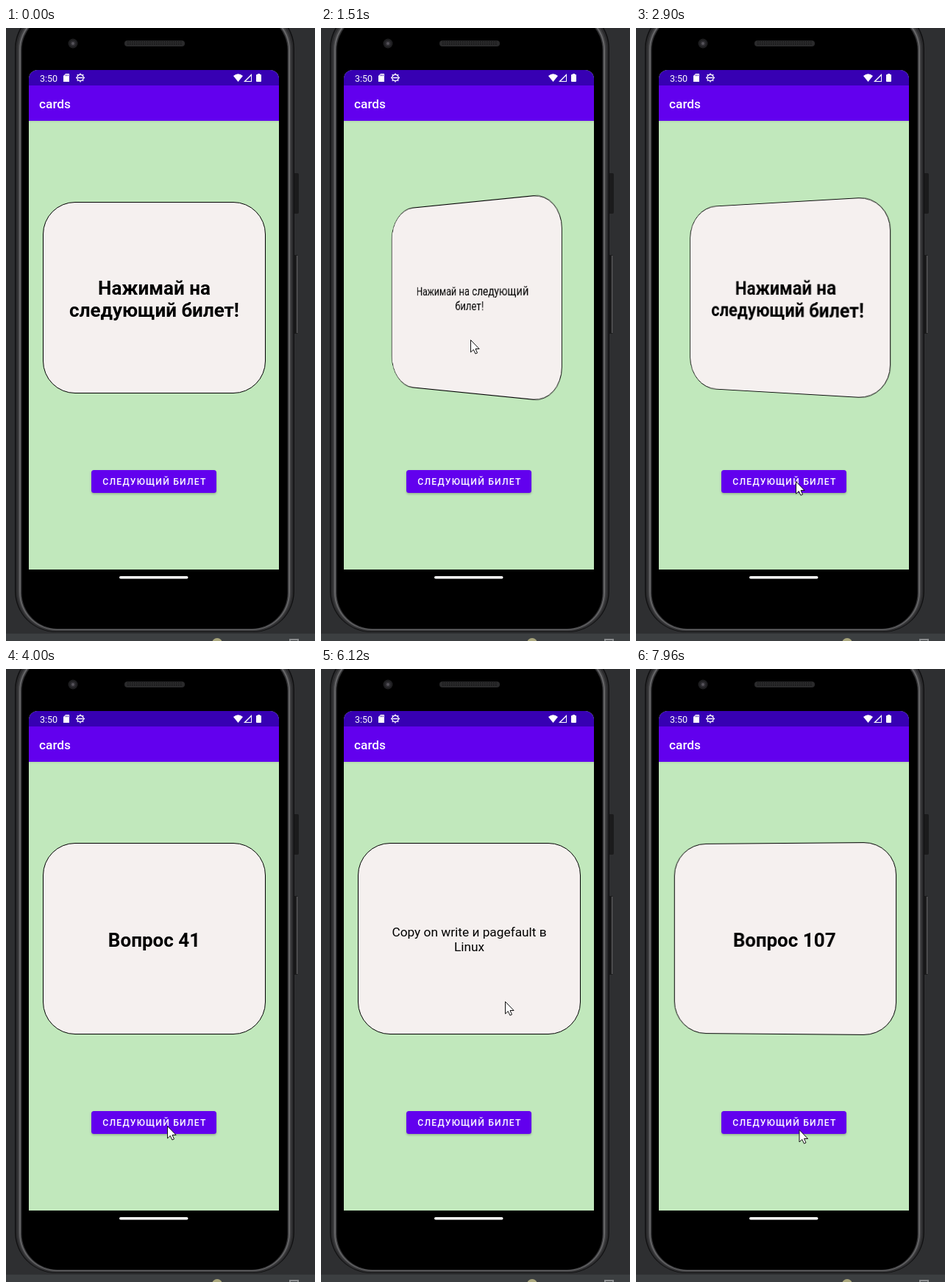
Write an HTML page with a canvas that moves like this. It is 420x832 px and loops after 8 s.

```html
<!DOCTYPE html>
<html lang="ru">
<head>
<meta charset="utf-8">
<title>cards</title>
<style>
  html, body { margin: 0; width: 100%; height: 100%; overflow: hidden; background: #2e2f31; }
  canvas { position: absolute; left: 0; top: 0; width: 420px; height: 832px; }
  #card {
    position: absolute; left: 50px; top: 236px; width: 303px; height: 260px;
    box-sizing: border-box; border: 1px solid #000; border-radius: 44px;
    background: #f5f0ef; color: #000;
    display: flex; align-items: center; justify-content: center;
  }
  #label {
    font: 400 17.3px/1.172 Roboto, sans-serif;
    text-align: center; white-space: pre; transform: translateY(.06em);
  }
  #label.front { font-weight: 700; font-size: 26px; }
</style>
</head>
<body>
<canvas id="phone" width="420" height="832"></canvas>
<div id="card"><div id="label"></div></div>
<canvas id="top" width="420" height="832"></canvas>
<script>
const LOOP = 8000;
const FLIP_MS = 1000;
const FLIPS = [826, 2150, 5120, 7056];
const PRESSES = [
  [740, 826], [2090, 2150], [3480, 3590], [4080, 4190], [4640, 4750], [5010, 5120], [6950, 7050]
];
const RIPPLES = [[3480, 3640], [4080, 4240], [4640, 5080]];
const HELLO = 'Нажимай на\nследующий билет!';
const FRONTS = [[0, HELLO], [3600, 'Вопрос 41'], [4200, 'Вопрос 23'], [4760, 'Вопрос 107']];
const BACKS = ['Нажимай на следующий\nбилет!', 'Copy on write и pagefault в\nLinux'];
// time, x, y of the pointer tip
const PATH = [
  [280, 367, 787], [440, 203, 423], [2560, 203, 423], [2900, 217, 615], [3020, 221, 630],
  [3270, 219, 620], [4820, 219, 620], [4990, 252, 451], [5120, 252, 451], [5200, 250, 451],
  [7200, 250, 451], [7440, 220, 569], [7680, 221.5, 625]
];
const BUTTON = [116, 600, 170, 31, 3.5];

const card = document.getElementById('card');
const label = document.getElementById('label');
const g = document.getElementById('phone').getContext('2d');
const c = document.getElementById('top').getContext('2d');

function box(ctx, x, y, w, h, r, fill) {
  ctx.beginPath();
  ctx.roundRect(x, y, w, h, r);
  if (fill) { ctx.fillStyle = fill; ctx.fill(); }
}

function disc(ctx, x, y, r, fill) {
  ctx.beginPath();
  ctx.arc(x, y, r, 0, 7);
  ctx.fillStyle = fill;
  ctx.fill();
}

function poly(ctx, pts, fill) {
  ctx.beginPath();
  pts.forEach(([x, y]) => ctx.lineTo(x, y));
  ctx.closePath();
  ctx.fillStyle = fill;
  ctx.fill();
}

function text(str, x, y, font, spacing = 0) {
  g.font = font + ' Roboto, sans-serif';
  g.letterSpacing = spacing + 'px';
  g.fillStyle = '#fff';
  g.fillText(str, x, y);
}

function drawBody() {
  box(g, 0, 0, 420, 832, 0, '#2e2f31');
  box(g, 0, 822, 420, 10, 0, '#3c3f41');
  disc(g, 287, 835, 7, '#a9a67c');
  box(g, 385, 829, 13, 5, 0, '#8b8d8f');
  box(g, 387, 831, 9, 3, 0, '#4a4d4f');

  box(g, 390, 197, 8, 55, 2, '#1b1b1c');
  box(g, 390, 308, 7, 107, 2, '#1b1b1c');
  box(g, 395, 309, 1.5, 105, 0, '#5c5c5e');

  // nested rims: side inset and colour, thinner at the bottom
  [[0, '#111112'], [1.5, '#2c2c2e'], [4, '#3f3f41'], [6, '#666668'], [8, '#303032'], [9.5, '#000']]
    .forEach(([d, col]) => box(g, 12 + d, -28 + d, 380 - 2 * d, 848 - 1.5 * d, 56 - d * 0.8, col));

  disc(g, 91, 21, 6.5, '#1e1e20');
  disc(g, 91, 21, 4, '#2d2c30');
  disc(g, 91, 21, 2, '#55535a');
  box(g, 161, 17, 82, 8, 4, '#2a2a2b');
  g.fillStyle = '#151516';
  for (let x = 165; x < 240; x += 3) for (let y = 18; y < 24; y += 3) g.fillRect(x, y, 1.5, 1.5);
}

function drawStatus() {
  text('3:50', 46, 72.5, '400 12.5px');
  poly(g, [[78, 65], [81, 62], [86, 62], [86, 73], [78, 73]], '#fff');
  g.fillStyle = '#3700b3';
  [80.5, 82.3, 84.1].forEach(x => g.fillRect(x, 63.2, 0.8, 2));

  g.strokeStyle = '#fff';
  g.lineWidth = 1.4;
  g.beginPath();
  g.arc(101, 67.5, 4.2, 0, 7);
  for (let i = 0; i < 8; i++) {
    const a = i * Math.PI / 4, x = Math.cos(a), y = Math.sin(a);
    g.moveTo(101 + x * 4, 67.5 + y * 4);
    g.lineTo(101 + x * 6, 67.5 + y * 6);
  }
  g.moveTo(98, 67.5);
  g.lineTo(104, 67.5);
  g.stroke();

  g.beginPath();
  g.moveTo(315.5, 73);
  g.lineTo(309, 65);
  g.quadraticCurveTo(315.5, 59.5, 322, 65);
  g.fillStyle = '#fff';
  g.fill();
  poly(g, [[323, 73], [334, 62], [334, 73]], '#fff');
  poly(g, [[326, 72], [333, 65], [333, 72]], '#3700b3');
  box(g, 340, 63, 7, 10, 1, '#fff');
  box(g, 342, 62, 3, 2, 0, '#fff');
}

function drawScreen() {
  g.save();
  box(g, 31, 57, 340, 678, [12, 12, 0, 0]);
  g.clip();
  box(g, 31, 57, 340, 678, 0, '#c1e8bc');
  const shade = g.createLinearGradient(0, 126, 0, 129);
  shade.addColorStop(0, 'rgba(0,0,0,.08)');
  shade.addColorStop(1, 'rgba(0,0,0,0)');
  box(g, 31, 126, 340, 3, 0, shade);
  box(g, 31, 78, 340, 48, 0, '#6200ee');
  box(g, 31, 57, 340, 21, 0, '#3700b3');
  g.restore();

  drawStatus();
  text('cards', 45, 108.8, '500 17.3px');

  g.save();
  g.shadowColor = 'rgba(0,0,0,.25)';
  g.shadowBlur = 3;
  g.shadowOffsetY = 1.5;
  box(g, ...BUTTON, '#6200ee');
  g.restore();
  g.textAlign = 'center';
  text('СЛЕДУЮЩИЙ БИЛЕТ', 202, 620.3, '500 12.2px', 1.2);

  box(g, 154, 744, 93.5, 3.4, 1.7, '#fff');
}

function pointer(t) {
  if (t < PATH[0][0]) return null;
  const i = PATH.findIndex(p => p[0] > t);
  if (i < 0) return PATH[PATH.length - 1].slice(1);
  const [t0, x0, y0] = PATH[i - 1], [t1, x1, y1] = PATH[i];
  const k = (t - t0) / (t1 - t0);
  return [x0 + (x1 - x0) * k, y0 + (y1 - y0) * k];
}

function drawCard(t) {
  let angle = 0, turns = 0;
  for (const start of FLIPS) {
    const k = Math.min(1, Math.max(0, (t - start) / FLIP_MS));
    const a = 90 * (1 - Math.cos(Math.PI * k));
    if (k > 0) angle = a > 90 ? a - 180 : a;
    if (a > 90) turns++;
  }
  const front = turns % 2 === 0;
  const str = front ? FRONTS.filter(f => f[0] <= t).pop()[1] : BACKS[turns >> 1];
  if (label.textContent !== str) label.textContent = str;
  label.className = front ? 'front' : '';
  card.style.transform = `perspective(1108px) rotateY(${angle.toFixed(3)}deg)`;
}

function drawRipple(t, [x, y]) {
  for (const [down, fade] of RIPPLES) {
    const age = t - down, alpha = 0.22 * Math.min(1, 1 - (t - fade) / 350);
    if (age < 0 || alpha <= 0) continue;
    c.save();
    box(c, ...BUTTON);
    c.clip();
    const px = Math.min(x, 219), py = Math.max(y, 616);
    disc(c, px, py, 15 + 110 * Math.min(1, age / 280), `rgba(255,255,255,${alpha})`);
    c.restore();
  }
}

function drawPointer(t, [x, y]) {
  if (PRESSES.some(([a, b]) => t >= a && t < b)) disc(c, x, y, 15, 'rgba(250,246,100,.9)');
  c.save();
  c.translate(x + 0.5, y + 0.5);
  c.lineJoin = 'round';
  poly(c, [[0, 0], [0, 16.5], [3.8, 13], [6.4, 18.6], [9, 17.5], [6.5, 12], [11.6, 12]], '#fff');
  c.strokeStyle = '#111';
  c.lineWidth = 1;
  c.stroke();
  c.restore();
}

function frame() {
  const t = performance.now() % LOOP;
  drawCard(t);
  c.clearRect(0, 0, 420, 832);
  const tip = pointer(t);
  if (tip) {
    drawRipple(t, tip);
    drawPointer(t, tip);
  }
  requestAnimationFrame(frame);
}

drawBody();
drawScreen();
frame();
</script>
</body>
</html>
```
